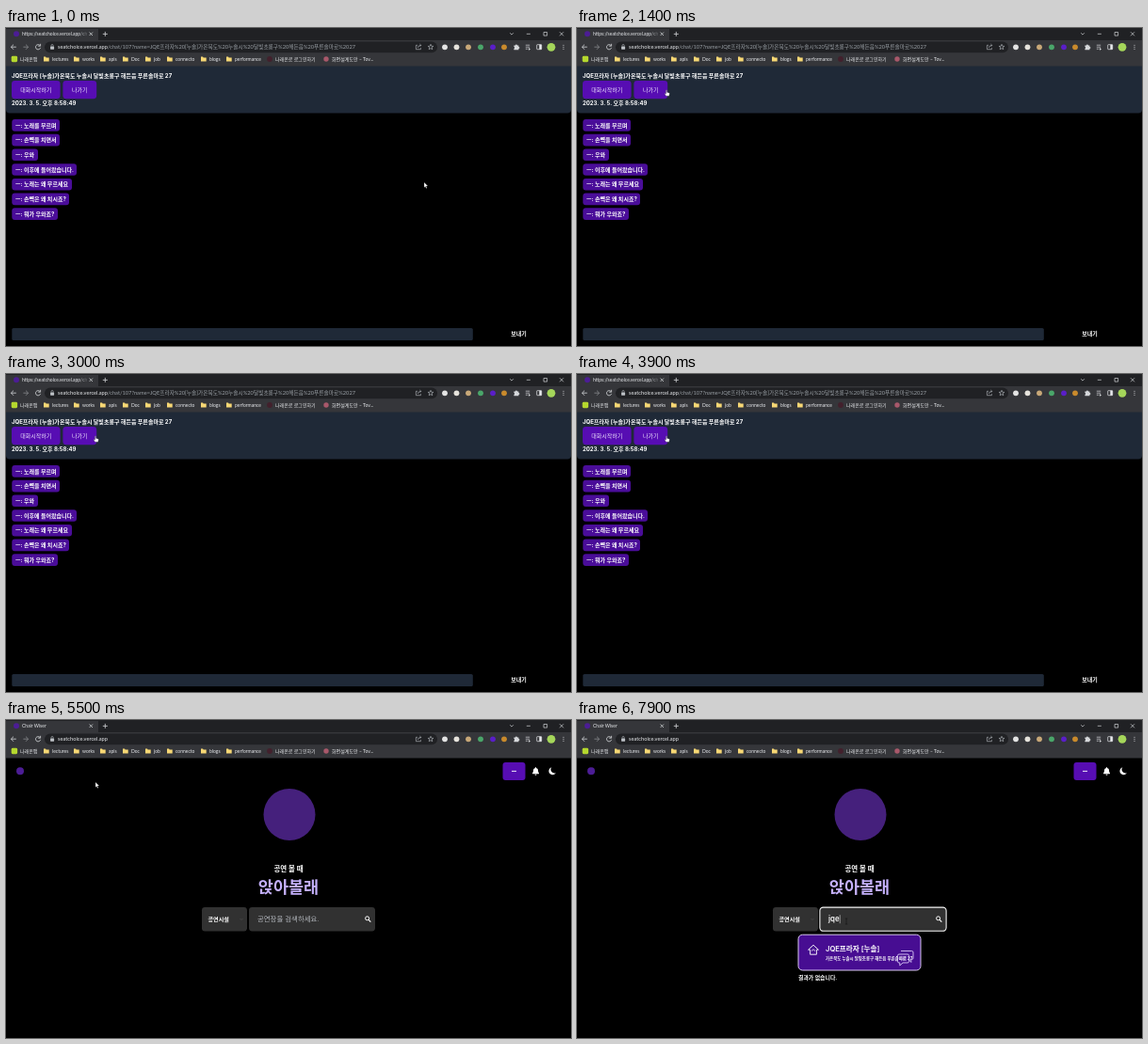
These frames come from a looping animation (600x338 px, 8 s). An HTML page:

```html
<!DOCTYPE html>
<html lang="ko">
<head>
<meta charset="utf-8">
<title>Chat and search</title>
<style>
  html, body { margin: 0; width: 100%; height: 100%; overflow: hidden; background: #000; }
  svg { display: block; width: 100vw; height: 100vh; }
  text { font-family: Inter, "Noto Sans CJK KR", "Noto Sans CJK", sans-serif; white-space: pre; }
  .ui text { font-family: Lato, "Noto Sans CJK KR", "Noto Sans CJK", sans-serif; }
</style>
</head>
<body>
<svg id="stage" viewBox="0 0 600 338" preserveAspectRatio="none"></svg>
<script>
const LOOP = 8000, STEP = 100;
const PRESS = 5100, LEAVE = 5300, FOCUS = 6400, RESULT = 7700;
const TYPING = [7100, 7300, 7500];
const QUERY = 'jqe';
const HALL = 'JQE프라자', CITY = '[누솔]';
const ADDRESS = '가온북도 누솔시 달빛초롱구 해든읍 푸른솔마로 27';
const HOST = 'seatchoice.vercel.app';
const QUERY_PATH = `/chat/107?name=${HALL} ${CITY}${ADDRESS}`.replace(/ /g, '%20');
const MESSAGES = [
  ['노래를 부르며', 57], ['손뼉을 치면서', 57], ['우와', 34], ['이후에 들어왔습니다.', 75],
  ['노래는 왜 부르세요', 70], ['손뼉은 왜 치시죠?', 67], ['뭐가 우와죠?', 55]
];
const FOLDERS = [['lectures', 40], ['works', 72], ['apis', 100], ['Doc', 124], ['job', 148],
  ['connecto', 171], ['blogs', 207], ['performance', 234]];
// time, x, y of the pointer
const POINTER = [
  [0, 444, 164], [300, 334, 205], [500, 222, 160], [700, 157, 96], [1000, 112, 76], [1300, 95, 66],
  [5500, 95, 66], [5800, 175, 128], [6100, 306, 212], [6400, 286, 214], [LOOP, 286, 214]
];

const attrs = o => Object.entries(o).map(([k, v]) => ` ${k}="${v}"`).join('');
const box = (x, y, w, h, r, fill, more = {}) =>
  `<rect${attrs({ x, y, width: w, height: h, rx: r, fill, ...more })}/>`;
const dot = (cx, cy, r, fill) => `<circle${attrs({ cx, cy, r, fill })}/>`;
const line = (d, stroke = '#d5d7da', w = 0.8, more = {}) =>
  `<path${attrs({ d, stroke, 'stroke-width': w, fill: 'none', ...more })}/>`;
const shape = (d, fill) => `<path${attrs({ d, fill })}/>`;
// y is the visual middle of the line of text
const label = (s, x, y, size, weight = 400, fill = '#fff', more = {}) =>
  `<text${attrs({ x, y: y + size * 0.37, 'font-size': size, 'font-weight': weight, fill, ...more })}>${s}</text>`;
const middle = { 'text-anchor': 'middle' };
const group = (id, body, cls = '') => `<g id="${id}" class="${cls}">${body}</g>`;

function windowFrame() {
  const folder = (name, x) =>
    shape(`M${x} 30.6h2l.7.8h3v4.2h-5.7z`, '#f7d774') + label(name, x + 9, 33, 5, 400, '#e8eaed');
  const extensions = [[466, '#e4e4e4'], [478.5, '#e6e3dc'], [491, '#c8a878'], [504, '#4aa66a'], [517, '#5a1ec8'], [529, '#c98a2c']];
  return box(0, 0, 600, 40.5, 0, '#35363a') + box(98, 0, 502, 13, 0, '#202124') +
    box(0, 0, 98, 1, 0, '#202124') + dot(11, 6.3, 3, '#4c1d95') +
    label('', 17, 6.3, 5, 400, '#e8eaed', { id: 'tabTitle' }) +
    line('M88.6 4.6l3.4 3.4m0-3.4l-3.4 3.4M102.8 6.4h5m-2.5-2.5v5') +
    line('M535.2 5.3l1.8 1.8 1.8-1.8M552.8 6.3h4M571 4.5h3.6v3.6h-3.6zM588 4.3l4 4m0-4l-4 4', '#d5d7da', 0.7) +
    line('M10.8 20.2H5.4m2.6-2.6l-2.6 2.6 2.6 2.6') +
    line('M18.4 20.2h5.2m-2.6-2.6l2.6 2.6-2.6 2.6', '#8a8c90') +
    line('M36 18.5a2.6 2.6 0 1 0 .6 2.4M36.6 16.8v2.4h-2.4') +
    box(41, 14.4, 417, 11.8, 5.9, '#202124') +
    box(47.1, 19.5, 4, 3.2, 0.4, '#bdc1c6') + line('M48 19.6v-1a1.1 1.1 0 0 1 2.2 0v1', '#bdc1c6', 0.6) +
    `<text x="55" y="22.4" font-size="5.7" fill="#e8eaed">${HOST}<tspan id="path" fill="#9aa0a6"></tspan></text>` +
    line('M437 18.3h-1.6v4.4h5v-1.6M437.4 21c.2-1.8 1.2-2.6 3.4-2.6m-1.4-1.4l1.4 1.4-1.4 1.4', '#bdc1c6', 0.6) +
    shapeStar(451, 20.3) +
    extensions.map(([x, c]) => dot(x, 20.3, 2.9, c)).join('') +
    shape('M539.4 18.6h1.5a1 1 0 0 1 2 0h1.5v1.4a1 1 0 0 1 0 2v1.2h-5v-1.3a1 1 0 0 0 0-1.9z', '#d5d7da') +
    line('M551.8 18.2h4.4m-4.4 2h4.4m-4.4 2h2.5', '#d5d7da', 0.7) + shape('M555 21l2 1.4-2 1.4z', '#d5d7da') +
    box(563.7, 17.7, 5, 5, 0.5, 'none', { stroke: '#e8eaed', 'stroke-width': 0.7 }) + box(566.3, 17.7, 2.4, 5, 0, '#e8eaed') +
    dot(579, 20.3, 4.4, '#a5d65a') +
    [18.3, 20.3, 22.3].map(y => dot(592, y, 0.55, '#d5d7da')).join('') +
    box(5.7, 29.8, 6.4, 6.4, 1.4, '#b5d82e') + label('나래온맵', 15, 33, 5, 400, '#e8eaed') +
    FOLDERS.map(([name, x]) => folder(name, x)).join('') +
    dot(280, 33, 2.9, '#42202c') + label('나래온로 로그인하기', 286, 33, 5, 400, '#e8eaed') +
    dot(340, 33, 2.7, '#a8586a') + label('화면설계도안 – Tov...', 346, 33, 5, 400, '#e8eaed');
}

function shapeStar(cx, cy) {
  const points = Array.from({ length: 10 }, (_, i) => {
    const r = i % 2 ? 1.3 : 3, a = i * Math.PI / 5;
    return `${(cx + r * Math.sin(a)).toFixed(2)} ${(cy - r * Math.cos(a)).toFixed(2)}`;
  });
  return line(`M${points.join('L')}z`, '#bdc1c6', 0.6);
}

function chatPage() {
  const button = (name, x, w) => box(x, 56, w, 19.2, 3.4, '#570db3') + label(name, x + w / 2, 65.5, 6, 500, '#f0e8ff', middle);
  const bubble = ([text, right], i) => {
    const y = 97.1 + i * 15.7;
    return box(6.3, y, right - 6.3, 12.6, 3, '#4a0d99') + label(`ㅡ: ${text}`, 10, y + 6.2, 6, 700);
  };
  return box(0, 36, 600, 54.6, 4, '#1f2937') +
    label(`${HALL} ${CITY}${ADDRESS}`, 6, 51, 6, 700) +
    button('대화시작하기', 6, 51.6) + group('leave', button('나가기', 60.4, 35.8)) +
    label('2023. 3. 5. 오후 8:58:49', 6, 79.5, 6, 700) +
    MESSAGES.map(bubble).join('') +
    box(6.3, 319, 489.5, 13, 1.6, '#1f2937') + label('보내기', 544.5, 325.2, 6, 700, '#fff', middle);
}

function homePage() {
  const white = '#fff', lilac = '#d9c8f5';
  const card = box(235, 228.2, 130, 37.8, 4.5, '#470d92', { stroke: '#d8c8f0', 'stroke-width': 1 }) +
    line('M245.6 244.2l5.4-5 5.4 5h-2v5h-6.8v-5z', white, 0.9, { 'stroke-linejoin': 'round' }) +
    line('M249 245.5l2-1.8 2 1.8', white, 0.8) +
    label(`${HALL} ${CITY}`, 264, 243, 7.6, 600) +
    label(ADDRESS, 264, 253, 4.45, 700) +
    line('M344 245.5h11.5q1.5 0 1.5 1.5v6q0 1.5-1.5 1.5h-.7v3l-2.6-3M342 249h9q1.5 0 1.5 1.5v6q0 1.5-1.5 1.5h-5l-3.2 3v-3h-.8q-1.5 0-1.5-1.5v-6q0-1.5 1.5-1.5z', lilac, 0.9) +
    line('M343.5 252h6m-6 2.6h6', lilac, 0.7) +
    label('결과가 없습니다.', 235, 274.3, 5.9, 700);
  return dot(15, 54.2, 4, '#4c1d95') +
    box(527.5, 45, 24, 19, 3, '#570db3') + line('M537 54.4h5', white, 0.9) +
    shape('M559 56.6q1-1 1-3a2.5 2.7 0 0 1 5 0q0 2 1 3v.6h-7zM561.5 57.7h2a1 1 0 0 1-2 0zM562 50.2h1v1h-1z', white) +
    shape('M579.4 50.3a4 4 0 1 0 4.6 5.6 3.7 3.7 0 0 1-4.6-5.6z', white) +
    dot(301, 100.5, 27.5, '#45207c') +
    label('공연 볼 때', 300, 158.2, 7.5, 700, white, middle) +
    label('앉아볼래', 300, 178, 17.5, 700, '#c4b0fb', middle) +
    box(208, 199, 48, 25.4, 3.2, '#313131') + label('공연시설', 214.5, 211.7, 6.1, 600) +
    line('M248.5 211l1.5 1.5 1.5-1.5', '#555', 0.6) +
    box(258, 199, 134, 25.4, 3.4, '#313131') +
    box(257.9, 199.1, 134.2, 25.2, 3.6, 'none', { id: 'ring', stroke: '#f2f2f2', 'stroke-width': 1.1 }) +
    label('공연장을 검색하세요.', 267, 211.6, 7.4, 400, '#b4b8be', { id: 'hint' }) +
    label('', 267, 211.6, 7.8, 600, white, { id: 'typed' }) +
    box(267, 207.2, 0.6, 9, 0, '#d8d8d8', { id: 'caret' }) +
    `<circle cx="383.6" cy="210.8" r="2" fill="none" stroke="#fff" stroke-width="1"/>` + line('M385.1 212.3l2.2 2.3', white, 1.2) +
    group('result', card);
}

const pointers =
  group('arrow', `<path d="M0 0v5.6l1.3-1.2.9 2 .9-.4-.9-2h1.8z" fill="#fff" stroke="#222" stroke-width=".3"/>`) +
  group('hand', `<path d="M-.5 0q.6-.7 1 0v2.3l2.3.6q.6.2.5 1l-.5 2.3H-.5L-2 3.8q.2-.8 1.5.2z" fill="#fff" stroke="#222" stroke-width=".3"/>`) +
  group('beam', line('M-1.2-3h2.4M0-3v6M-1.2 3h2.4', '#111', 0.6));

document.getElementById('stage').innerHTML = box(0, 0, 600, 338, 0, '#000') +
  group('chat', chatPage()) + group('home', homePage()) + group('frame', windowFrame(), 'ui') + group('pointer', pointers);

const el = id => document.getElementById(id);
const show = (id, on) => el(id).setAttribute('display', on ? 'inline' : 'none');

function pointerAt(t) {
  const i = POINTER.findIndex(k => k[0] > t);
  const [t0, x0, y0] = POINTER[i - 1], [t1, x1, y1] = POINTER[i];
  const p = (t - t0) / (t1 - t0);
  return [x0 + (x1 - x0) * p, y0 + (y1 - y0) * p];
}

function draw(t) {
  const home = t >= LEAVE;
  const typed = QUERY.slice(0, TYPING.filter(time => t >= time).length);
  const [x, y] = pointerAt(t);

  show('chat', !home);
  show('home', home);
  el('tabTitle').innerHTML = home ? 'Chair Wiser'
    : `https://${HOST}<tspan fill="#a5a7aa">/c</tspan><tspan fill="#66686c">h</tspan>`;
  el('path').textContent = home ? '' : QUERY_PATH;
  el('leave').setAttribute('transform', t >= PRESS ? 'translate(78.3 65.9) scale(.97) translate(-78.3 -65.6)' : '');

  show('ring', t >= FOCUS);
  show('caret', t >= FOCUS);
  show('hint', !typed);
  show('result', t >= RESULT);
  el('typed').textContent = typed;
  el('caret').setAttribute('x', 267 + (typed && home ? el('typed').getComputedTextLength() + 0.3 : 0));

  const overButton = !home && x < 97 && y < 76;
  const overInput = home && x > 258 && y > 199;
  show('hand', overButton);
  show('beam', overInput);
  show('arrow', !overButton && !overInput);
  el('pointer').setAttribute('transform', `translate(${x} ${y})`);
}

const start = performance.now();
function tick() {
  const t = (performance.now() - start) % LOOP;
  draw(Math.floor(t / STEP) * STEP);
  requestAnimationFrame(tick);
}
tick();
</script>
</body>
</html>
```
